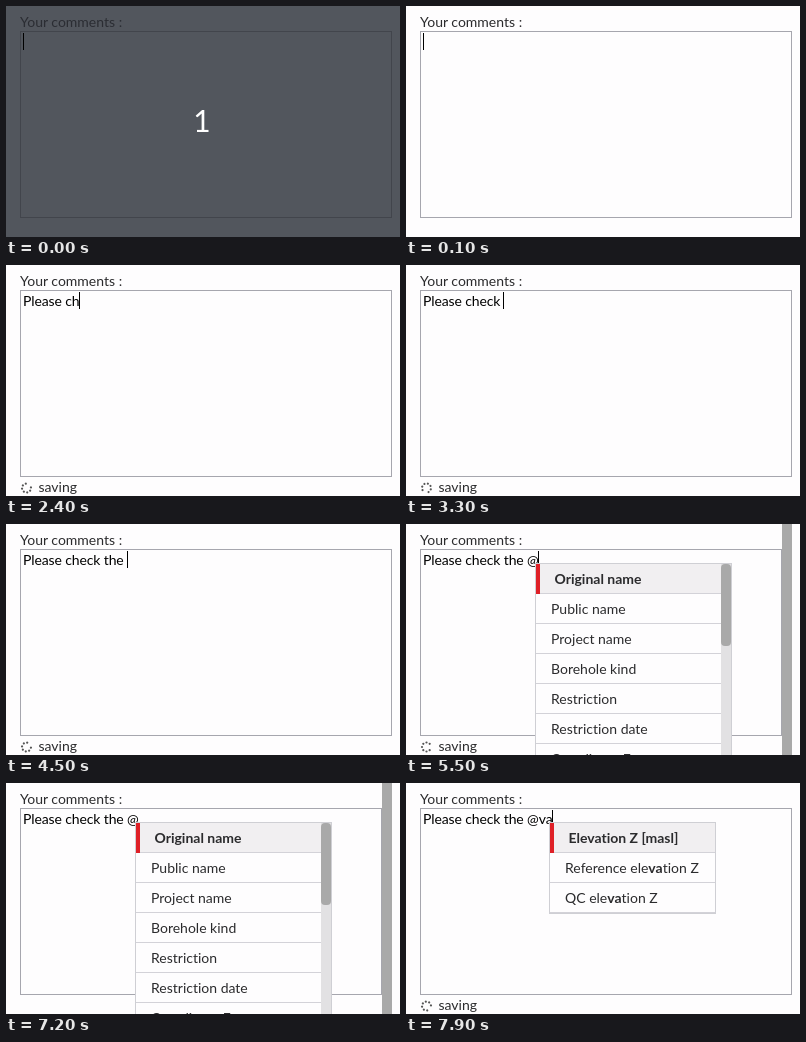
Recreate the animation shown at these times as an HTML page. Size 394x231 px, loop 8 s.

```html
<!DOCTYPE html>
<html lang="en">
<head>
<meta charset="utf-8">
<title>Comment box with suggestions</title>
<style>
html, body { margin: 0; width: 100%; height: 100%; overflow: hidden; background: #fefdfe; }
svg { display: block; width: 394px; height: 231px; }
text { font: 14px Lato, sans-serif; font-variant-ligatures: none; fill: #2b2b2d; white-space: pre; }
.bold { font-weight: 700; }
#typed { fill: #000; letter-spacing: -.12px; }
#count { font-size: 30px; fill: #fff; text-anchor: middle; }
</style>
</head>
<body>
<svg viewBox="0 0 394 231">
  <rect id="page" width="394" height="231"/>
  <text id="label" x="14" y="21">Your comments :</text>
  <rect id="area" x="14.5" y="25.5" height="186" fill="none"/>
  <text id="typed" x="17" y="41"></text>
  <rect id="caret" y="27" width="1" height="17"/>
  <g id="saving">
    <g id="spinner" fill="#555"></g>
    <text x="32.5" y="227">saving</text>
  </g>
  <g id="popup"></g>
  <rect id="scroll" x="376" width="10" height="231" fill="#a9a9a9"/>
  <text id="count" x="196" y="126">1</text>
</svg>
<script>
const LOOP = 8000;
const $ = id => document.getElementById(id);
const show = (id, on) => $(id).setAttribute('visibility', on ? 'visible' : 'hidden');
const set = (id, attrs) => { for (const k in attrs) $(id).setAttribute(k, attrs[k]); };
const rect = (x, y, w, h, fill, extra = '') =>
  `<rect x="${x}" y="${y}" width="${w}" height="${h}" fill="${fill}" ${extra}/>`;

const fields = ['Original name', 'Public name', 'Project name', 'Borehole kind',
  'Restriction', 'Restriction date', 'Coordinate E'];
const matches = ['Elevation Z [masl]', 'Reference elevation Z', 'QC elevation Z'];

// Each run types its text one key per 200 ms.
const runs = [[700, 'Please check '], [3400, 'the '], [5500, '@'], [7700, 'va']];
const blinks = [300, 4800, 5300, 6200, 6700, 7200];
const saves = [[700, 4900], [5500, 6400], [7700, LOOP]];

for (let i = 1; i < 8; i++) {
  const a = i * Math.PI / 4;
  $('spinner').innerHTML +=
    `<circle cx="${4.5 * Math.cos(a)}" cy="${4.5 * Math.sin(a)}" r="1.1"/>`;
}

function typedAt(t) {
  return runs.map(([start, s]) =>
    s.slice(0, Math.max(0, Math.floor((t - start) / 200) + 1))).join('');
}

function caretOn(t) {
  let last = 0;
  for (const [start, s] of runs) {
    if (t >= start) last = Math.min(start + 200 * (s.length - 1), t);
  }
  return blinks.filter(b => b > last && b <= t).length % 2 === 0;
}

function popupMarkup(items, w, query, scrolls) {
  const h = items.length * 30 + (scrolls ? 60 : 0);
  let out = rect(.5, 39.5, w - 1, h + 1, '#fefdfe', 'stroke="#cfcfd4"');
  items.forEach((item, i) => {
    const y = 40 + i * 30;
    const left = i ? 1 : 5;
    if (!i) out += rect(1, y, w - 2, 29, '#f1eff1') + rect(1, y, 4, 30, '#df2027');
    const name = query && i ? item.replace(query, `<tspan class="bold">${query}</tspan>`) : item;
    out += `<text x="${i ? 16 : 19.5}" y="${y + 20}" class="${i ? '' : 'bold'}">${name}</text>`;
    out += rect(left, y + 29, w - 1 - left, 1, '#d3d2d8');
  });
  if (scrolls) out += rect(186, 40, 10, h, '#e2e1e3') + rect(186, 40, 10, 82, '#a9a9a9', 'rx="4"');
  return out;
}

let text = null, caretX = 17;

function setText(s) {
  if (s === text) return;
  text = s;
  $('typed').textContent = s;
  caretX = 17 + Math.floor(s ? $('typed').getComputedTextLength() : 0);
  const [, query] = s.split('@');
  $('popup').innerHTML = query === undefined ? ''
    : query ? popupMarkup(matches, 167, query, false)
    : popupMarkup(fields, 197, '', true);
  set('popup', { transform: `translate(${caretX - 3} 0)` });
}

function draw(t) {
  const dark = t < 100;
  const wide = t < 5500 || t >= 7700;
  setText(typedAt(t));
  set('page', { fill: dark ? '#52565d' : '#fefdfe' });
  set('area', { width: wide ? 371 : 361, stroke: dark ? '#42454c' : '#a6a6ae' });
  $('label').style.fill = dark ? '#2b2d33' : '#2b2b2d';
  set('caret', { x: caretX });
  show('caret', caretOn(t));
  show('scroll', !wide);
  show('count', dark);

  const save = saves.find(([a, b]) => t >= a && t < b);
  show('saving', save);
  if (save) {
    const angle = Math.floor((t - save[0]) / 100) * 18;
    set('spinner', { transform: `translate(20.5 223) rotate(${angle})` });
  }
}

const begin = performance.now();
function tick() {
  draw((performance.now() - begin) % LOOP);
  requestAnimationFrame(tick);
}
draw(0);
requestAnimationFrame(tick);
</script>
</body>
</html>
```
